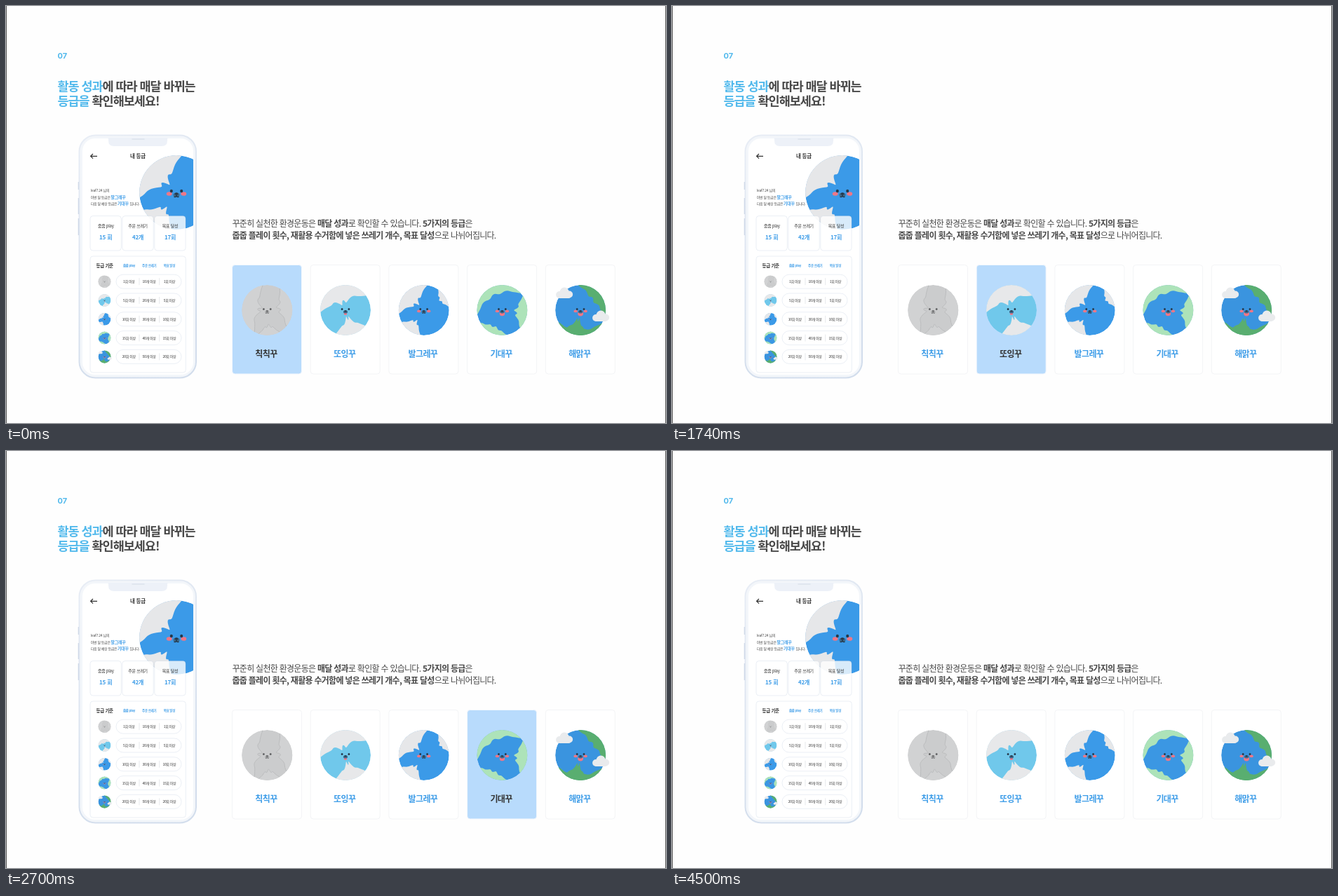
Write an HTML page that moves like this. It is 941x595 px and loops after 4530 ms.

```html
<!DOCTYPE html>
<html lang="ko">
<head>
<meta charset="utf-8">
<style>
html, body { margin: 0; width: 100%; height: 100%; overflow: hidden; background: #fefefe; }
svg { display: block; width: 941px; height: 595px; font-family: "Noto Sans CJK KR", "Noto Sans CJK", sans-serif; fill: #484848; }
.b { font-weight: 700; }
.sky { fill: #51b9ec; }
.blue { fill: #3e9de8; }
.dark { fill: #333; }
.mid { text-anchor: middle; }
.title { font-size: 17.5px; letter-spacing: -1.04px; font-weight: 700; }
.para { font-size: 12px; letter-spacing: -.72px; }
.panel { fill: #fff; stroke: #8aa0c030; stroke-width: .9; }
.card rect { fill: #fff; stroke: #f3f4f6; }
.card text { font-size: 12px; letter-spacing: -.6px; font-weight: 700; fill: #3e9de8; }
.card.on rect { fill: #b8dbfc; stroke: #f2f7fd; }
.card.on text { fill: #333; }
</style>
</head>
<body>
<svg viewBox="0 0 941 595">
  <defs>
    <clipPath id="disc"><circle r="36"/></clipPath>
    <clipPath id="screen"><rect x="109" y="189" width="158" height="337" rx="18"/></clipPath>
    <linearGradient id="rim" x1="0" y1="0" x2=".35" y2="1">
      <stop offset="0" stop-color="#e8edf5"/>
      <stop offset="1" stop-color="#d2ddec"/>
    </linearGradient>
    <g id="globes"></g>
  </defs>
  <path d="M.5 0V595M940.5 0V595" stroke="#5a5a5a"/>

  <text class="b sky" x="73.5" y="74.7" font-size="11" style="font-family: Inter, sans-serif">07</text>
  <text class="title" x="73.5" y="120.7"><tspan class="sky">활동 성과</tspan>에 따라 매달 바뀌는</text>
  <text class="title" x="73.5" y="142"><tspan class="sky">등급을</tspan> 확인해보세요!</text>
  <text class="para" x="322.5" y="315">꾸준히 실천한 환경운동은 <tspan class="b">매달 성과</tspan>로 확인할 수 있습니다. <tspan class="b">5가지의 등급</tspan>은</text>
  <text class="para" x="322.5" y="332"><tspan class="b">줍줍 플레이 횟수, 재활용 수거함에 넣은 쓰레기 개수, 목표 달성</tspan>으로 나뉘어집니다.</text>

  <path d="M103.6 251v11M103.6 274v23M103.6 303v24" stroke="#b9c7dd" stroke-width="1.6"/>
  <rect x="104.5" y="184.5" width="166.5" height="346" rx="23" fill="#f3f6fa" stroke="url(#rim)" stroke-width="2"/>
  <rect x="109" y="189" width="158" height="337" rx="18" fill="#fff"/>
  <path d="M145 188h86q-1 0-1 4 0 8-8 8h-68q-8 0-8-8 0-4-1-4z" fill="#edf1f8"/>
  <path d="M180 190h17" stroke="#dce2ec" stroke-width="1.4" stroke-linecap="round"/>
  <g id="phone" clip-path="url(#screen)"></g>
  <g id="cards"></g>
</svg>
<script>
const $ = id => document.getElementById(id);
const add = (id, markup) => $(id).insertAdjacentHTML('beforeend', markup);

// Land along the rim between two angles (degrees, clockwise from the right), with a wavy coast
function land([from, to, depth]) {
  const N = 40, points = [];
  const polar = (u, r) => {
    const a = (from + (to - from) * u) * Math.PI / 180;
    return [r * Math.cos(a), r * Math.sin(a)].map(v => v.toFixed(2));
  };
  for (let i = 0; i <= N; i++) {
    const u = i / N;
    points.push(polar(u, 36 - depth * Math.sin(Math.PI * u) ** .8 * (1 + .14 * Math.sin(u * 22 + from))));
  }
  for (let i = N; i >= 0; i--) points.push(polar(i / N, 40));
  return `<path d="M${points.join('L')}z"/>`;
}

const dot = (x, y, rx, ry, fill) => `<ellipse cx="${x}" cy="${y}" rx="${rx}" ry="${ry}" fill="${fill}"/>`;
const pair = (x, y, rx, ry, fill) => dot(-x, y, rx, ry, fill) + dot(x, y, rx, ry, fill);
const cloud = (x, y) => `<g transform="translate(${x} ${y})" fill="#e9ebed">` +
  '<circle cx="-7" cy="2" r="5"/><circle cy="-2" r="6.5"/><circle cx="7" cy="1.5" r="5"/><rect x="-9" y="1" width="18" height="6" rx="3"/></g>';

const grades = [
  { name: '칙칙꾸', sea: '#cbcccd', coast: '#d1d2d3', edge: '#b7b8b9', lands: [[120, 260, 26], [300, 400, 20], [60, 110, 14]] },
  { name: '또잉꾸', sea: '#70c8eb', coast: '#e7e8ea', lands: [[175, 325, 25], [38, 112, 25]], tongue: 2 },
  { name: '발그레꾸', sea: '#3b9ae8', coast: '#e6e7e9', lands: [[172, 278, 23], [98, 152, 17], [305, 352, 9]], cheeks: 1 },
  { name: '기대꾸', sea: '#3b97e3', coast: '#ade3b9', lands: [[170, 318, 12], [325, 405, 17], [80, 150, 10]], cheeks: 1, tongue: 3.2 },
  { name: '해맑꾸', sea: '#3a94df', coast: '#59ae70', lands: [[265, 375, 13], [30, 152, 8], [75, 130, 23]], cheeks: 1, tongue: 3.4, clouds: 1 },
];

function face({ cheeks, tongue }) {
  const plain = !cheeks && !tongue, ink = plain ? '#626365' : '#26384a';
  return (cheeks ? pair(7, 1.4, 2.7, 1.9, '#ee7787') : '') +
    pair(4.9, -1.4, 1.4, 1.5, ink) +
    (tongue ? dot(0, 5, tongue * 1.15, tongue, '#f27686') : '') +
    dot(0, 2.4, 3.1, 2.1, plain ? '#aeafb0' : '#3a6a8c') +
    dot(0, 1.3, 1.7, 1.1, ink) +
    (tongue ? '' : `<path d="M-2.4 4.1q1.6 1.2 2.4-1.2q.8 2.4 2.4 1.2" fill="none" stroke="${ink}" stroke-width=".9"/>`);
}

const globe = (i, x, y, scale) => `<use href="#globe${i}" transform="translate(${x} ${y}) scale(${scale})"/>`;
const text = (s, x, y, size, cls = '', gap = -.3) =>
  `<text class="${cls}" x="${x}" y="${y}" font-size="${size}" letter-spacing="${gap}">${s}</text>`;
const panel = (x, y, w, h, r, extra = '') =>
  `<rect class="panel" x="${x}" y="${y}" width="${w}" height="${h}" rx="${r}" ${extra}/>`;

grades.forEach((g, i) => {
  const x = 372.3 + 111.7 * i;
  add('globes', `<g id="globe${i}"><g clip-path="url(#disc)"><circle r="36" fill="${g.sea}"/>` +
    `<g fill="${g.coast}" stroke="${g.edge || 'none'}" stroke-width=".8">${g.lands.map(land).join('')}</g></g>` +
    face(g) + (g.clouds ? cloud(-23, -24) + cloud(29, 9) : '') + '</g>');
  add('cards', `<g class="card"><rect x="${x - 49.8}" y="369.5" width="99" height="155.5" rx="4"/>` +
    globe(i, x, 434, 1) + `<text class="mid" x="${x - 1.3}" y="501">${g.name}</text></g>`);
});

// Phone screen
add('phone',
  globe(2, 243, 266, 1.47) +
  '<path d="M130 214.3h-9.3M124 211l-3.4 3.3 3.4 3.3" fill="none" stroke="#333" stroke-width="1.2"/>' +
  text('내 등급', 188, 217, 7.5, 'b dark mid', -.2) +
  text('leaf7.24 님의', 120.7, 265, 5, '', -.2) +
  text('이번 달 등급은', 120.7, 274.5, 5) + text('발그레꾸', 149.6, 275, 6, 'b blue') +
  text('다음 달 예상 등급은', 120.7, 283.7, 5) + text('기대꾸', 159, 284.2, 6, 'b blue') + text('입니다.', 176.5, 283.7, 5) +
  panel(120, 357, 136.3, 166, 4) + text('등급 기준', 128.5, 373, 6.5, 'b dark'));

[['줍줍 play', '15 회'], ['주운 쓰레기', '42개'], ['목표 달성', '17회']].forEach(([head, value], i) => {
  const x = 142.2 + 45.9 * i;
  add('phone',
    panel(x - 22.2, 299.5, 44.3, 49.5, 4, 'fill-opacity=".8"') +
    text(head, x, 316, 6, 'mid dark') +
    text(value, x, 333.4, 8, 'b blue mid', -.2) +
    text(head, 175.5 + 28.7 * i, 372.3, 4.5, 'b blue mid'));
});

grades.forEach((g, i) => {
  const y = 393.2 + 26.8 * i, count = Math.max(1, 5 * i);
  add('phone',
    globe(i, 140.5, y, .25) + panel(157, y - 10, 93, 20, 10) +
    `<path d="M190 ${y - 5}v10M218.7 ${y - 5}v10" stroke="#dcdfe3" stroke-width=".7"/>` +
    [count + '회', 10 * (i + 1) + '개', count + '회'].map((s, k) => text(s + ' 이상', 175.3 + 28.8 * k, y + 1.9, 5, 'mid dark')).join(''));
});

// Each card lights up for 900 ms, then none for the last 30 ms
const LOOP = 4530, STEP = 900;
const cards = [...document.querySelectorAll('.card')];
function draw(now) {
  const active = Math.floor(now % LOOP / STEP);
  cards.forEach((card, i) => card.classList.toggle('on', i === active));
  requestAnimationFrame(draw);
}
draw(0);
</script>
</body>
</html>
```
